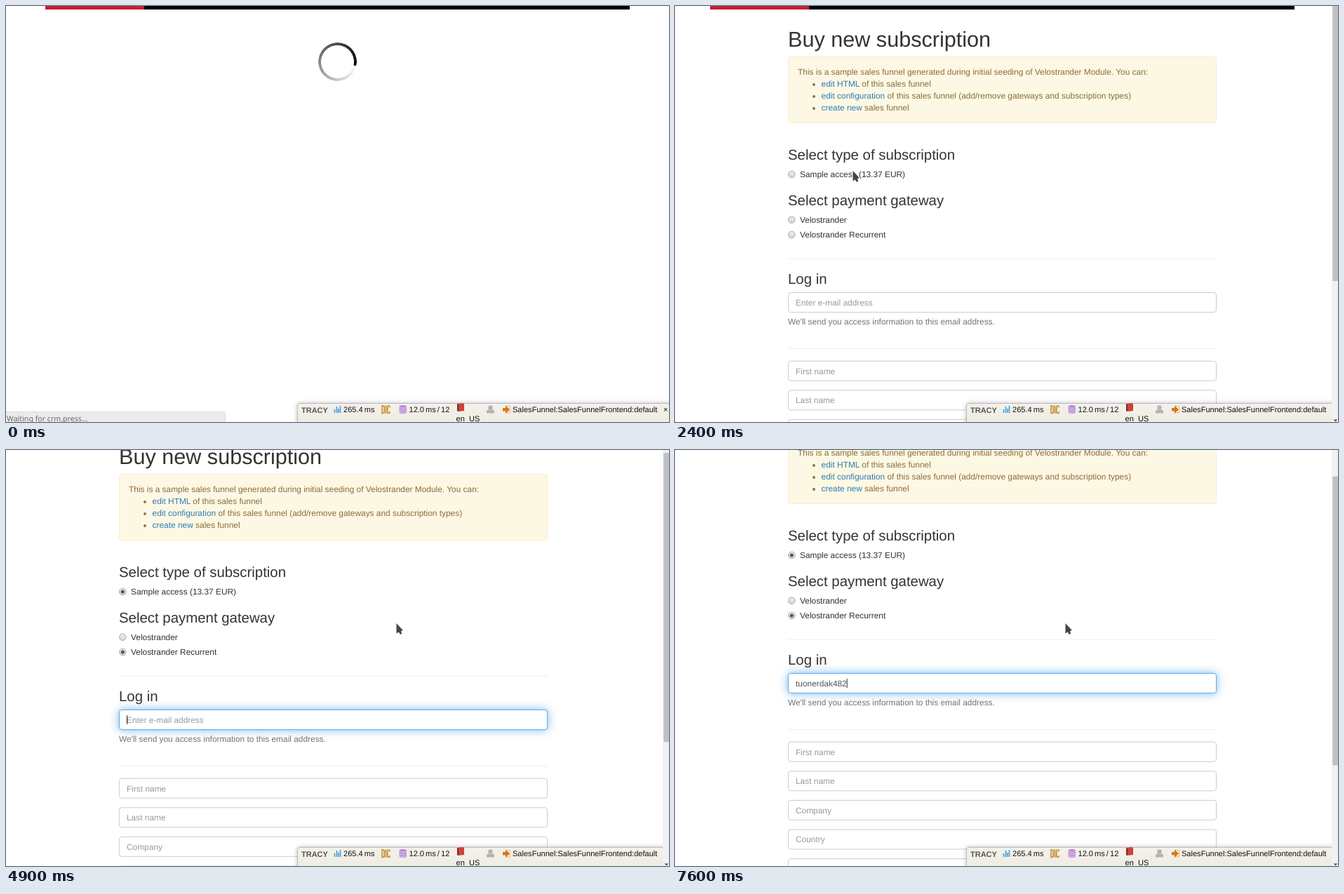
Recreate the animation shown at these times as an HTML page. Size 945x593 px, loop 8000 ms.

```html
<!DOCTYPE html>
<html lang="en">
<head>
<meta charset="utf-8">
<title>Buy new subscription</title>
<style>
html, body { margin: 0; width: 100%; height: 100%; overflow: hidden; background: #fff; }
svg { display: block; position: absolute; left: 0; top: 0;
  font: 11.9px "Liberation Sans", Arial, sans-serif; text-rendering: geometricPrecision; }
text { white-space: pre; }
#spinner { position: absolute; left: 445px; top: 52px; width: 55px; height: 55px; border-radius: 50%;
  background: conic-gradient(#fff, #000);
  -webkit-mask: radial-gradient(circle, transparent 23px, #000 23.8px);
  mask: radial-gradient(circle, transparent 23px, #000 23.8px); }
#page { fill: #333; }
.h1 { font-size: 30.6px; }
.h3 { font-size: 20.4px; }
.alert { fill: #8a6d3b; }
.link { fill: #337ab7; }
.help { fill: #737373; }
.hint { fill: #999; }
.field { fill: #fff; stroke: #ccc; }
.focus { stroke: #66afe9; filter: drop-shadow(0 0 6.8px rgba(102,175,233,.6)) drop-shadow(0 0 2px rgba(102,175,233,.4)); }
.radio circle:first-child { fill: url(#knob); stroke: #a0a0a0; stroke-width: .9; }
.radio circle + circle { fill: #555; visibility: hidden; }
.radio.on circle + circle { visibility: visible; }
#bar { font-size: 11.05px; fill: #111; word-spacing: -1px; }
</style>
</head>
<body>
<svg width="945" height="593" viewBox="0 0 945 593">
  <defs>
    <linearGradient id="knob" x2="0" y2="1"><stop stop-color="#eee"/><stop offset="1" stop-color="#d4d4d4"/></linearGradient>
    <linearGradient id="metal" x2="0" y2="1"><stop stop-color="#f3f1ea"/><stop offset="1" stop-color="#edeae0"/></linearGradient>
  </defs>

  <g id="scroller">
    <g id="header"><rect x="56" width="833" height="5"/><rect x="56" width="141" height="5" fill="#c02038"/></g>
    <g id="page">
      <text class="h1" x="161" y="57.5">Buy new subscription</text>
      <rect x="161.5" y="72.5" width="610" height="94" rx="3.4" fill="#fcf8e3" stroke="#faebcc"/>
      <g class="alert">
        <text x="175" y="98.2">This is a sample sales funnel generated during initial seeding of Velostrander Module. You can:</text>
        <circle cx="198" cy="112" r="1.9"/><circle cx="198" cy="129" r="1.9"/><circle cx="198" cy="146" r="1.9"/>
        <text x="208.6" y="115.2"><tspan class="link">edit HTML</tspan> of this sales funnel</text>
        <text x="208.6" y="132.2"><tspan class="link">edit configuration</tspan> of this sales funnel (add/remove gateways and subscription types)</text>
        <text x="208.6" y="149.2"><tspan class="link">create new</tspan> sales funnel</text>
      </g>
      <text class="h3" x="161" y="219">Select type of subscription</text>
      <text class="h3" x="161" y="283.5">Select payment gateway</text>
      <text class="h3" x="161" y="395.5">Log in</text>
      <text class="help" x="161" y="454">We'll send you access information to this email address.</text>
      <path d="M161 360.3H772M161 488.5H772" stroke="#eee"/>
    </g>
    <circle id="helper" cx="755.3" cy="422.8" r="6.8" fill="#2b86c0"/>
    <rect id="caret" y="416" width="1" height="13" fill="#333"/>
  </g>

  <g id="status">
    <path d="M-1 578.5H309.5a3 3 0 0 1 3 3V594H-1z" fill="#ebebeb" stroke="#dcdcdc"/>
    <text x="1" y="592" fill="#666" style="font:10.6px 'Noto Sans','Open Sans',sans-serif">Waiting for crm.press...</text>
  </g>

  <g id="bar">
    <rect x="415.5" y="566.5" width="540" height="40" rx="3" fill="url(#metal)" stroke="#bbb"
      style="filter:drop-shadow(0 0 3px rgba(0,0,0,.25))"/>
    <text x="421" y="579.5" fill="#555" font-weight="bold" textLength="auto" style="font-size:11px">TRACY</text>
    <path d="M468.5 580v-5M471.5 580v-9M474 580v-6M476.5 580v-10" stroke="#4aa0e0" stroke-width="1.7"/>
    <text x="481" y="579">265.4 ms</text>
    <path d="M536 570v10.5h1.5q1.7 0 1.7-2v-6.500q0-2-1.700-2zM541.500 569.500v11.500M547.200 572.500v-1q0-1.500-1.700-1.500t-1.700 1.500v7.500q0 1.500 1.700 1.500t1.700-1.500v-1"
      fill="none" stroke="#c4841d" stroke-width="1.500"/>
    <path d="M560.500 571v8c0 2.700 10.500 2.700 10.500 0v-8c0-2.700-10.500-2.700-10.500 0z" fill="#b888d8"/>
    <path d="M560.500 571.500c0 2.400 10.500 2.400 10.500 0m-10.500 3c0 2.400 10.500 2.400 10.500 0m-10.500 3c0 2.400 10.500 2.400 10.500 0" fill="none" stroke="#eadcf3"/>
    <text x="574.500" y="579">12.0 ms / 12</text>
    <path d="M643 567l8-1 2 1v10l-8 1-2-1z" fill="#cb4437"/><path d="M643 567v10l2 1v-10z" fill="#7d2a25"/>
    <text x="641.500" y="592">en_US</text>
    <path d="M685 580.500v-2.500q0-2.500 3-2.500h5q3 0 3 2.500v2.500z" fill="#b3b3b0"/><circle cx="690.500" cy="572.500" r="3.200" fill="#b3b3b0"/>
    <path d="M712 570.500h6.500v9.500H712" fill="none" stroke="#e8bd83"/>
    <path d="M708 573h4v-3.500l6 5.700-6 5.700v-3.400h-4z" fill="#d9761a"/>
    <text x="722" y="579">SalesFunnel:SalesFunnelFrontend:default</text>
    <text x="937" y="579">×</text>
  </g>

  <g id="scrollbar">
    <rect x="936" width="9" height="593" fill="#f1f1f1"/>
    <rect id="thumb" x="937.300" width="8" height="412" fill="#c1c1c1"/>
    <path d="M938.500 589.500h6l-3 3z" fill="#505050"/>
  </g>

  <path id="cursor" d="M1.500 1V15.500L4.700 13.500 7 17 9.200 15.800 8 12.200 10.800 11z" fill="#444" stroke="#fff" stroke-width="1.600" paint-order="stroke"/>
</svg>
<div id="spinner"></div>

<script>
const $ = id => document.getElementById(id);
const show = (id, on) => $(id).style.display = on ? '' : 'none';
const move = (id, x, y) => $(id).setAttribute('transform', `translate(${x} ${y})`);
const add = html => $('page').insertAdjacentHTML('beforeend', html);

[['Sample access (13.37 EUR)', 240], ['Velostrander', 304.7], ['Velostrander Recurrent', 326]].forEach(([label, y], i) =>
  add(`<g class="radio" id="radio${i}"><circle cx="166.300" cy="${y}" r="4.800"/><circle cx="166.300" cy="${y}" r="2.500"/></g>
    <text x="178" y="${y + 4.2}">${label}</text>`));

const field = (label, y, id) => add(`<rect class="field" id="${id}" x="161.500" y="${y}" width="610" height="28" rx="3.400"/>
  <text class="hint" id="${id}Text" x="172" y="${y + 18.4}">${label}</text>`);
field('Enter e-mail address', 408.5, 'email');
['First name', 'Last name', 'Company', 'Country', 'Postal code'].forEach((label, i) =>
  field(label, 506.2 + i * 41.6, 'field' + i));

const LOADED = 1500, FOCUS = 4400, NAME = 'tuonerdak482';
const keyTimes = [6100, 6200, 6300, 6500, 6600, 6700, 6900, 7000, 7200, 7400, 7600, 7600];
const scrollKeys = [[0, 0], [4900, 38], [5000, 74.7], [5100, 90]];
const cursorKeys = [
  [2000, 303, 119], [2100, 287, 158], [2200, 268, 200], [2300, 247, 236], [2400, 252, 234], [2600, 245, 237],
  [2900, 270, 246], [3000, 289, 254], [3200, 283, 266], [3300, 270, 288], [3400, 257, 306], [3500, 253, 317],
  [3600, 252, 321], [3800, 260, 338], [3900, 277, 374], [4000, 294, 407], [4100, -50, 0], [4700, 555, 246]];
const latest = (keys, t) => keys.findLast(k => k[0] <= t);

function draw(t) {
  const loaded = t >= LOADED, focused = t >= FOCUS;
  const scroll = latest(scrollKeys, t)[1];
  show('spinner', !loaded);
  $('spinner').style.transform = `rotate(${102 + t * .36}deg)`;
  $('status').style.opacity = Math.max(0, Math.min(1, (700 - t) / 300));
  for (const id of ['page', 'scrollbar']) show(id, loaded);
  move('header', loaded ? -6 : 0, 0);
  move('scroller', 0, -scroll);
  $('thumb').setAttribute('y', -20 + scroll * .64);

  $('radio0').classList.toggle('on', t >= 2800);
  $('radio2').classList.toggle('on', t >= 3700);

  $('email').classList.toggle('focus', focused);
  const typed = keyTimes.filter(k => k <= t).length;
  const text = $('emailText');
  text.textContent = NAME.slice(0, typed) || 'Enter e-mail address';
  text.style.fill = typed ? '#555' : '';
  show('helper', t >= 4500 && t < 4900);
  show('caret', t >= 4500 && t < 5000 || t >= 5600);
  $('caret').setAttribute('x', 172 + (typed ? text.getComputedTextLength() : 0));

  const at = latest(cursorKeys, t);
  show('cursor', at);
  if (at) move('cursor', at[1], at[2]);
}

const start = performance.now();
function tick() {
  draw(Math.floor((performance.now() - start) % 8000 / 100) * 100);
  requestAnimationFrame(tick);
}
tick();
</script>
</body>
</html>
```
